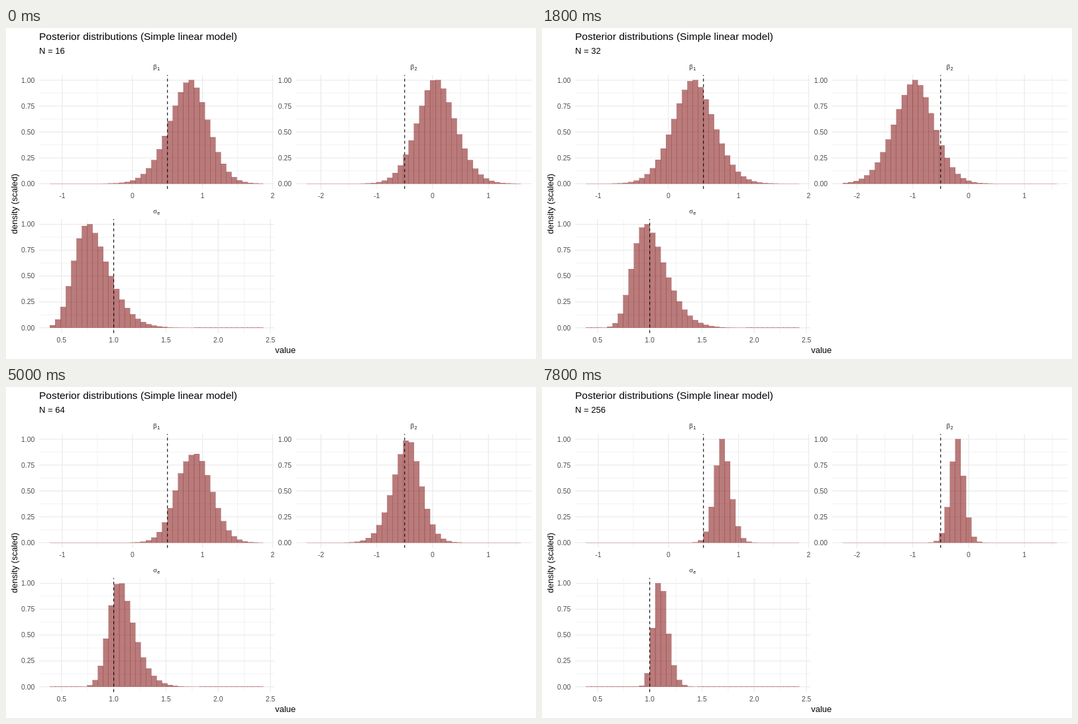
An HTML page that plays this animation: 800x500 px, repeating every 8000 ms.

```html
<!DOCTYPE html>
<html lang="en">
<head>
<meta charset="utf-8">
<title>Posterior distributions</title>
<style>
  html, body { margin: 0; width: 100%; height: 100%; overflow: hidden; background: #fff; }
  svg { display: block; }
  text { font-family: "Liberation Sans", Arial, sans-serif; font-size: 13px; }
  .title { font-size: 15.46px; }
  .tick { font-size: 10.4px; fill: #4d4d4d; }
  .greek { font: 10.4px "Liberation Serif", serif; fill: #1a1a1a; }
  .sub { font-size: 7.3px; fill: #1a1a1a; }
  .major { stroke: #ebebeb; stroke-width: 1.26; }
  .minor { stroke: #ebebeb; stroke-width: .63; }
  .bar { fill: #8b2323; fill-opacity: .6; stroke: #8b2323; stroke-width: .22; }
  .truth { stroke: #000; stroke-width: 1.07; stroke-dasharray: 4.27; }
</style>
</head>
<body>
<svg id="stage" width="800" height="500" viewBox="0 0 800 500"></svg>
<script>
const LOOP = 8000, STEP = 200, PERIOD = 2000, BLEND_STEPS = 5;
const BINS = 40, PANEL_HEIGHT = 172, PAD = PANEL_HEIGHT * .05 / 1.1;
const UNIT_HEIGHT = PANEL_HEIGHT / 1.1;
const FIRST_SIZE = 16;

// Every posterior is a bell, in bins, with its own spread to the left and right of the mode.
const bell = (mode, left, right) => ({ mode, left, right });

const panels = [
  { x: 50, y: 71, w: 355, zero: 190.8, unit: 105.85, from: -1, to: 2, grid: 1, digits: 0,
    truth: .5, greek: "β", sub: "1", leftPower: 1.85, rightPower: 1.85,
    posteriors: [bell(25.8, 3.78, 3.25), bell(19.6, 3.68, 3.8), bell(27.2, 3.08, 2.8),
                 bell(24, 1.95, 1.83), bell(25, 1.33, 1.48)] },
  { x: 437.8, y: 71, w: 356, zero: 643.9, unit: 84.3, from: -2, to: 1.5, grid: 1, digits: 0,
    truth: -.5, greek: "β", sub: "2", leftPower: 1.85, rightPower: 1.85,
    posteriors: [bell(23.5, 3.3, 3.6), bell(13, 3.75, 3.45), bell(18.3, 2.82, 2.5),
                 bell(18.8, 2.08, 1.68), bell(20.85, 1.22, 1.22)] },
  { x: 50, y: 288.7, w: 355, zero: 4.9, unit: 157.7, from: .5, to: 2.5, grid: .5, digits: 1,
    truth: 1, greek: "σ", sub: "e", leftPower: 2.4, rightPower: 1.6,
    posteriors: [bell(6.8, 2.95, 3.4), bell(10.9, 2.75, 3.25), bell(12.7, 2.38, 2.6),
                 bell(12.6, 1.7, 1.6), bell(13.5, 1.38, 1.2)] }
];

const stage = document.getElementById("stage");

function add(tag, attrs, content = "") {
  const node = document.createElementNS("http://www.w3.org/2000/svg", tag);
  for (const name in attrs) node.setAttribute(name, attrs[name]);
  node.textContent = content;
  return stage.appendChild(node);
}
const label = (x, y, content, attrs = {}) => add("text", { x, y, ...attrs }, content);
const vertical = (x, top, cls) =>
  add("line", { x1: x, x2: x, y1: top + PANEL_HEIGHT, y2: top, class: cls });
const horizontal = (panel, y, cls) =>
  add("line", { x1: panel.x, x2: panel.x + panel.w, y1: y, y2: y, class: cls });

// Bar heights, scaled so that the tallest bar is 1.
function histogram({ mode, left, right }, { leftPower, rightPower }) {
  const heights = Array.from({ length: BINS }, (_, bin) => {
    const z = bin < mode ? ((mode - bin) / left) ** leftPower : ((bin - mode) / right) ** rightPower;
    return Math.exp(-z / 2);
  });
  const peak = Math.max(...heights);
  return heights.map(height => height / peak);
}

function drawGrid(panel, toX, toY) {
  const { x, y, from, to, grid, digits } = panel;
  for (let v = 0; v < 1; v += .25) horizontal(panel, toY(v + .125), "minor");
  for (let v = from + grid / 2; v <= to; v += grid) vertical(toX(v), y, "minor");
  for (let v = 0; v <= 1; v += .25) {
    horizontal(panel, toY(v), "major");
    label(x - 6.7, toY(v) + 3.7, v.toFixed(2), { class: "tick", "text-anchor": "end" });
  }
  for (let v = from; v <= to; v += grid) {
    vertical(toX(v), y, "major");
    label(toX(v), y + 186.2, v.toFixed(digits), { class: "tick", "text-anchor": "middle" });
  }
}

function buildPanel(panel) {
  const { x, y, w } = panel;
  const toX = value => panel.zero + value * panel.unit;
  panel.base = y + PANEL_HEIGHT - PAD;
  drawGrid(panel, toX, value => panel.base - value * UNIT_HEIGHT);

  const width = w / 1.1 / BINS;
  const left = x + w * .05 / 1.1;
  panel.states = panel.posteriors.map(posterior => histogram(posterior, panel));
  panel.bars = Array.from({ length: BINS }, (_, bin) =>
    add("rect", { x: left + bin * width, width, class: "bar" }));

  vertical(toX(panel.truth), y, "truth");
  const middle = x + w / 2;
  label(middle - 5.3, y - 9, panel.greek, { class: "greek" });
  label(middle + .7, y - 7, panel.sub, { class: "sub" });
}

panels.forEach(buildPanel);
label(50, 18, "Posterior distributions (Simple linear model)", { class: "title" });
const subtitle = label(50, 39, "");
label(421.7, 491, "value", { "text-anchor": "middle" });
label(0, 0, "density (scaled)", { "text-anchor": "middle", transform: "translate(16.5 265.7) rotate(-90)" });

// The blend advances in whole steps, then rests until the next period.
function draw(time) {
  const shifted = time % LOOP + PERIOD / 2;
  const next = Math.floor(shifted / PERIOD);
  const previous = Math.max(0, next - 1);
  const step = Math.floor(shifted % PERIOD / STEP) + 1;
  const blend = Math.min(1, step / BLEND_STEPS);

  subtitle.textContent = "N = " + FIRST_SIZE * 2 ** (blend >= .8 ? next : previous);
  for (const { states, bars, base } of panels) {
    bars.forEach((bar, bin) => {
      const from = states[previous][bin];
      const height = (from + (states[next][bin] - from) * blend) * UNIT_HEIGHT;
      bar.setAttribute("y", base - height);
      bar.setAttribute("height", Math.max(height, .05));
    });
  }
}

const start = performance.now();
function tick() {
  draw(performance.now() - start);
  requestAnimationFrame(tick);
}
draw(0);
requestAnimationFrame(tick);
</script>
</body>
</html>
```
